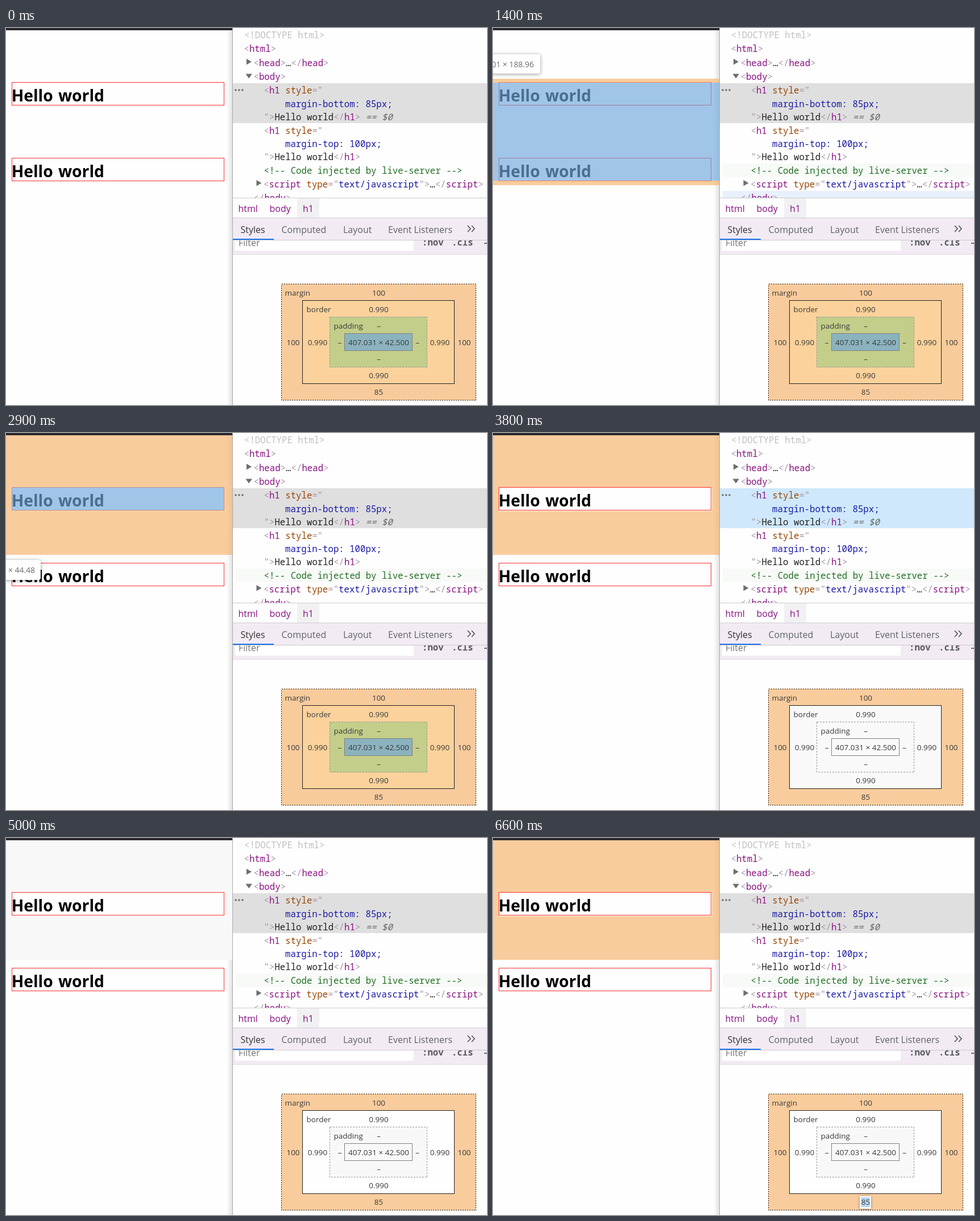
Animation of 846 by 662 pixels, one loop 8000 ms. Source, as an HTML page:

```html
<!DOCTYPE html>
<html lang="en">
<head>
<meta charset="utf-8">
<title>Margin collapsing in the inspector</title>
<style>
html, body { margin: 0; width: 100%; height: 100%; overflow: hidden; background: #fff; }
svg { display: block; width: 846px; height: 662px; }
text { white-space: pre; font-family: "Open Sans", sans-serif; font-size: 16px; }
rect, .crisp { shape-rendering: crispEdges; }

.heading { font-weight: 700; font-size: 28.2px; word-spacing: 2px; }
.frame { fill: none; stroke: #fb3030; }
.code text, .mono { font-family: "Noto Sans Mono", monospace; font-size: 15.72px; }
.code text { fill: #a894a6; }
.code .tag, .crumbs text { fill: #881280; }
.code .attr { fill: #994500; }
.code .val { fill: #1a1aa6; }
.code .plain { fill: #222; }
.code .note { fill: #236e25; }
.code .doc { fill: #c0c0c0; }
.code .ref { fill: #666; font-style: italic; }
.icon { fill: #6e6e6e; }
.tabs text { fill: #5f6368; }
.mono { font-weight: 700; fill: #5a5a5e; }
.hover { fill: #e8f0fb; }

.content { fill: rgba(111,168,220,.66); }
.margin { fill: rgba(246,178,107,.66); fill-rule: evenodd; }
.edge { fill: none; stroke: #ba9295; }
.tip rect { fill: #fff; filter: drop-shadow(0 1px 3px rgba(0,0,0,.4)); }
.tip text { font-size: 13.9px; fill: #6b6b6f; text-anchor: end; }

.model text { font-size: 13.5px; fill: #3a3a3a; }
.mid text { text-anchor: middle; }
.lines rect { fill: none; stroke: #222; }

/* Layers switch hard; 1.25% is 100 ms. */
.t { opacity: 0; animation: 8s step-end infinite; }
.on-body { animation-name: body; }
.on-second { animation-name: second; }
.on-first { animation-name: first; }
.on-margin { animation-name: margin; }
.on-border { animation-name: border; }
.on-trace { animation-name: trace; }
.on-row { animation-name: row; }
.on-note { animation-name: note; }
.on-script { animation-name: script; }
.on-all { animation-name: all; }
.on-ring { animation-name: ring; }
.on-tint { animation-name: tint; }
.on-edit { animation-name: edit; }
@keyframes body { 0%, 7.5%, 18.75% { opacity: 0 } 6.25%, 17.5% { opacity: 1 } }
@keyframes second { 0%, 10%, 15%, 23.75% { opacity: 0 } 7.5%, 12.5%, 22.5% { opacity: 1 } }
@keyframes first { 0%, 12.5%, 45% { opacity: 0 } 10%, 23.75% { opacity: 1 } }
@keyframes margin { 0%, 50%, 62.5% { opacity: 0 } 46.25%, 52.5%, 82.5%, 100% { opacity: 1 } }
@keyframes border { 0%, 52.5%, 82.5% { opacity: 0 } 50%, 78.75% { opacity: 1 } }
@keyframes trace { 0%, 52.5%, 82.5% { opacity: 0 } 50%, 62.5% { opacity: 1 } }
@keyframes row { 0%, 62.5% { opacity: 0 } 46.25% { opacity: 1 } }
@keyframes note { 0% { opacity: 0 } 15%, 100% { opacity: 1 } }
@keyframes script { 0%, 17.5% { opacity: 0 } 16.25% { opacity: 1 } }
@keyframes all { 0% { opacity: 1 } 46.25%, 100% { opacity: 0 } }
@keyframes ring { 0%, 50%, 78.75% { opacity: 0 } 46.25%, 52.5%, 82.5%, 100% { opacity: 1 } }
@keyframes tint { 0%, 50% { opacity: 0 } 46.25% { opacity: 1 } }
@keyframes edit { 0% { opacity: 0 } 72.5%, 100% { opacity: 1 } }
</style>
</head>
<body>
<svg viewBox="0 0 846 662">
  <defs>
    <clipPath id="page"><rect y="4" width="398" height="658"/></clipPath>
    <clipPath id="tree"><rect x="399" width="447" height="298"/></clipPath>
    <clipPath id="filter"><rect x="399" y="373" width="447" height="25"/></clipPath>
    <linearGradient id="shade"><stop stop-opacity="0"/><stop offset="1" stop-opacity=".11"/></linearGradient>
  </defs>

  <!-- Page -->
  <rect width="846" height="662" fill="#fefefe"/>
  <g clip-path="url(#page)">
    <rect x="388" y="4" width="10" height="658" fill="url(#shade)"/>
    <path class="t on-trace crisp" fill="#f8f8f8" fill-rule="evenodd" d="M0 4H398V214H0ZM10 95H385V137H10Z"/>
    <rect class="frame" x="10.5" y="95.5" width="373" height="40"/>
    <rect class="frame" x="10.5" y="228.5" width="373" height="40"/>
    <text class="heading" x="9.8" y="129">Hello world</text>
    <text class="heading" x="9.8" y="262">Hello world</text>

    <g class="t on-body">
      <path class="margin crisp" d="M0 89H398V276H0ZM0 96H398V268H0Z"/>
      <rect class="content" y="96" width="398" height="172"/>
      <g class="tip"><rect x="-90" y="46" width="173" height="34" rx="4"/><text x="72" y="69">409.01 × 188.96</text></g>
    </g>
    <g class="t on-second">
      <path class="margin crisp" d="M0 136H398V361H0ZM10 228H385V270H10Z"/>
      <rect class="content" x="11" y="229" width="372" height="39"/>
      <rect class="edge" x="10.5" y="228.5" width="373" height="40"/>
      <g class="tip"><rect x="-90" y="92" width="151" height="35" rx="4"/><text x="51" y="116">409.01 × 44.48</text></g>
    </g>
    <g class="t on-first">
      <path class="margin crisp" d="M0 4H398V214H0ZM10 95H384V136H10Z"/>
      <rect class="content" x="11" y="96" width="372" height="39"/>
      <rect class="edge" x="10.5" y="95.5" width="373" height="40"/>
      <g class="tip"><rect x="-90" y="223" width="151" height="35" rx="4"/><text x="51" y="246">409.01 × 44.48</text></g>
    </g>
    <path class="t on-margin margin crisp" d="M0 4H398V214H0ZM10 95H385V137H10Z"/>
    <rect class="t on-border" x="10.5" y="95.5" width="373" height="40" fill="none" stroke="#ffa965"/>
  </g>
  <rect width="399" height="4" fill="#2b292d"/>
  <rect x="398" width="1" height="662" fill="#aaa"/>

  <!-- Element tree -->
  <g class="code" clip-path="url(#tree)">
    <rect x="399" y="97" width="447" height="70" fill="#dfdfdf"/>
    <rect class="t on-row" x="399" y="97" width="447" height="70" fill="#cfe8fc"/>
    <rect class="t on-second hover" x="404" y="168" width="442" height="70"/>
    <rect class="t on-note" x="404" y="238" width="442" height="24" fill="#f7faf7"/>
    <rect class="t on-script hover" x="404" y="262" width="442" height="24"/>
    <rect class="t on-body hover" x="404" y="286" width="442" height="24"/>
    <path class="icon" d="M423 54L432 59.3L423 64.5ZM421.5 80.5H433L427.2 88.5ZM440.5 267L449.5 272.3L440.5 277.5Z"/>
    <g class="icon"><circle cx="404" cy="109" r="1.8"/><circle cx="410" cy="109" r="1.8"/><circle cx="416" cy="109" r="1.8"/></g>
    <g transform="translate(0 1)">
      <text x="419" y="17"><tspan class="doc">&lt;!DOCTYPE html&gt;</tspan></text>
      <text x="418.5" y="41">&lt;<tspan class="tag">html</tspan>&gt;</text>
      <text x="435.5" y="66">&lt;<tspan class="tag">head</tspan>&gt;<tspan class="plain">…</tspan>&lt;/<tspan class="tag">head</tspan>&gt;</text>
      <text x="435.5" y="90">&lt;<tspan class="tag">body</tspan>&gt;</text>
      <text x="453.5" y="114">&lt;<tspan class="tag">h1</tspan> <tspan class="attr">style</tspan>="</text>
      <text x="491" y="138"><tspan class="val">margin-bottom: 85px;</tspan></text>
      <text x="453.5" y="161">"&gt;<tspan class="plain">Hello world</tspan>&lt;/<tspan class="tag">h1</tspan>&gt;<tspan class="ref"> == $0</tspan></text>
      <text x="453.5" y="185">&lt;<tspan class="tag">h1</tspan> <tspan class="attr">style</tspan>="</text>
      <text x="491" y="208"><tspan class="val">margin-top: 100px;</tspan></text>
      <text x="453.5" y="231">"&gt;<tspan class="plain">Hello world</tspan>&lt;/<tspan class="tag">h1</tspan>&gt;</text>
      <text x="453.5" y="255"><tspan class="note">&lt;!-- Code injected by live-server --&gt;</tspan></text>
      <text x="453" y="279">&lt;<tspan class="tag">script</tspan> <tspan class="attr">type</tspan>="<tspan class="val">text/javascript</tspan>"&gt;<tspan class="plain">…</tspan>&lt;/<tspan class="tag">script</tspan>&gt;</text>
      <text x="435.5" y="303">&lt;/<tspan class="tag">body</tspan>&gt;</text>
    </g>
  </g>

  <!-- Breadcrumbs and tabs -->
  <g class="crumbs">
    <rect x="399" y="298" width="447" height="1" fill="#cdcdd0"/>
    <rect x="512" y="299" width="39" height="34" fill="#f1f1f4"/>
    <text x="408.5" y="323">html</text>
    <text x="463.5" y="323">body</text>
    <text x="522" y="323">h1</text>
  </g>
  <g class="tabs">
    <rect x="399" y="333" width="447" height="65" fill="#f3ebf4"/>
    <rect x="399" y="333" width="447" height="1" fill="#cfccd1"/>
    <rect x="399" y="372" width="447" height="1" fill="#cbc8ce"/>
    <rect x="399" y="370" width="72" height="2" fill="#1a73e8"/>
    <text x="412.5" y="360" style="fill:#333">Styles</text>
    <text x="484.5" y="360">Computed</text>
    <text x="593" y="360">Layout</text>
    <text x="672" y="360">Event Listeners</text>
    <path d="M812 347L817 352.5L812 358M819 347L824 352.5L819 358" fill="none" stroke="#55565a" stroke-width="1.7"/>
  </g>
  <g clip-path="url(#filter)">
    <rect x="403" y="373" width="314" height="18" fill="#fff"/>
    <text x="409" y="383" fill="#757575">Filter</text>
    <text class="mono" x="732" y="382">:hov</text>
    <text class="mono" x="784" y="382">.cls</text>
    <rect x="841" y="377" width="5" height="2" fill="#6e6e6e"/>
  </g>
  <rect x="399" y="397" width="447" height="1" fill="#dfd9e1"/>

  <!-- Box model -->
  <g class="model">
    <rect x="569" y="507" width="172" height="89" fill="#f8f8f8"/>
    <rect class="t on-tint" x="521" y="478" width="268" height="147" fill="#f9f9f9"/>
    <path class="t on-ring crisp" fill="#f9cc9d" fill-rule="evenodd" d="M484 449H827V654H484ZM521 478H789V625H521Z"/>
    <path class="t on-border crisp" fill="#fbd39b" fill-rule="evenodd" d="M521 478H789V625H521ZM569 507H741V596H569Z"/>
    <g class="t on-all">
      <rect x="484" y="449" width="343" height="205" fill="#f8cb9c"/>
      <rect x="521" y="478" width="268" height="147" fill="#fbd29b"/>
      <rect x="569" y="507" width="172" height="89" fill="#c3ce8a"/>
      <rect x="595" y="536" width="120" height="31" fill="#8bb3bf"/>
    </g>
    <g class="lines">
      <rect x="484.5" y="449.5" width="342" height="204" stroke-dasharray="2 2"/>
      <rect x="521.5" y="478.5" width="267" height="146"/>
      <rect x="569.5" y="507.5" width="171" height="88" style="stroke:#999" stroke-dasharray="3 2"/>
      <rect x="595.5" y="536.5" width="119" height="30" style="stroke:#808080"/>
    </g>
    <g class="t on-edit">
      <rect x="645" y="629" width="20" height="22" fill="#fff" style="filter:drop-shadow(0 1px 2px rgba(0,0,0,.45))"/>
      <rect x="647" y="631" width="16" height="17" fill="#b3d7f7"/>
    </g>
    <text x="490.5" y="469.5">margin</text>
    <text x="528.5" y="498.5">border</text>
    <text x="576.5" y="527.5">padding</text>
    <g class="mid">
      <text x="655.5" y="469.5">100</text>
      <text x="655.5" y="498.5">0.990</text>
      <text x="655.5" y="527.5">–</text>
      <text x="505" y="557">100</text>
      <text x="548" y="557">0.990</text>
      <text x="587" y="557">–</text>
      <text x="655.5" y="557">407.031 × 42.500</text>
      <text x="723.5" y="557">–</text>
      <text x="763" y="557">0.990</text>
      <text x="806" y="557">100</text>
      <text x="655.5" y="586">–</text>
      <text x="655.5" y="615">0.990</text>
      <text x="655.5" y="644">85</text>
    </g>
  </g>
</svg>
</body>
</html>
```
